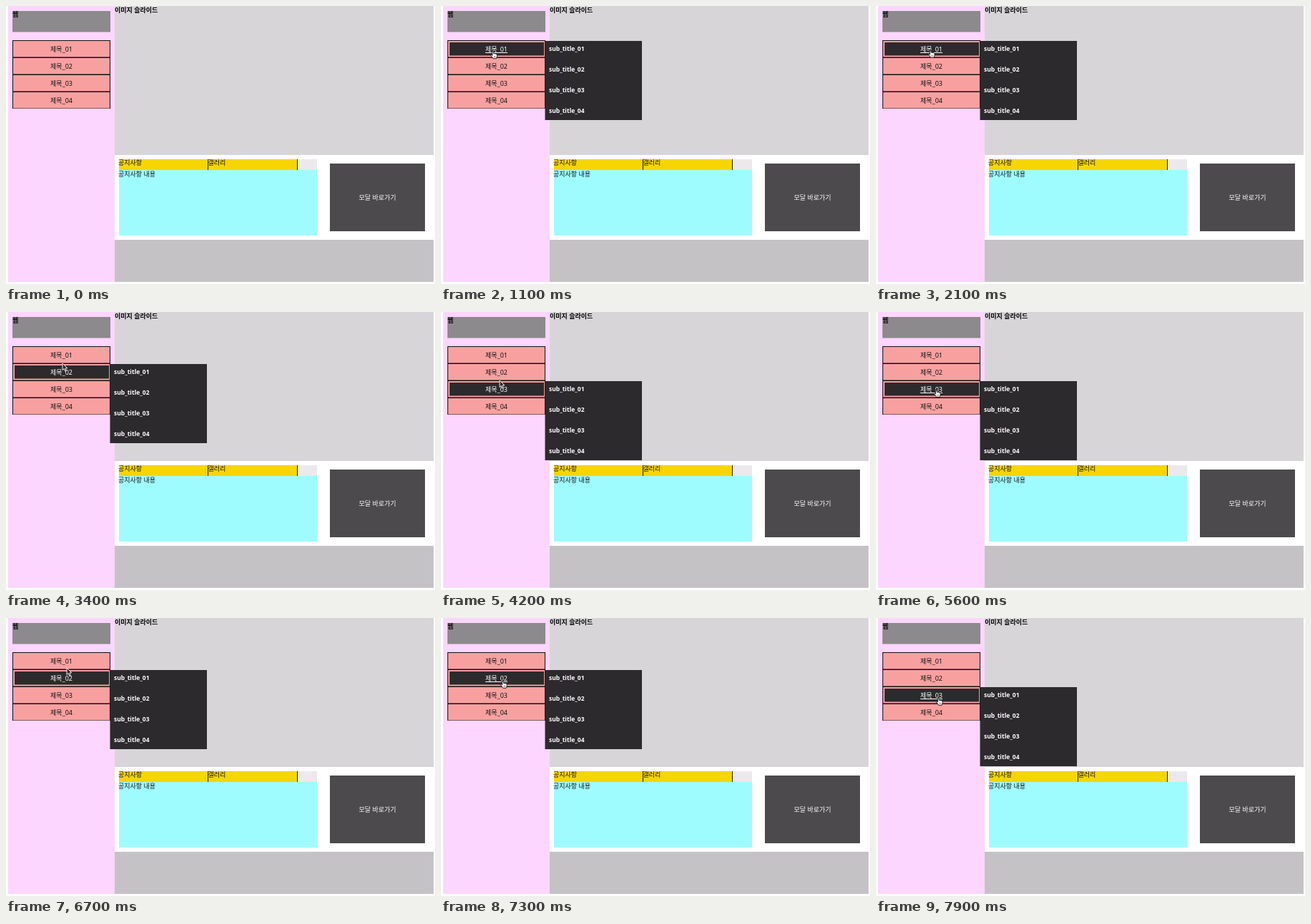
Write an HTML page with a canvas that moves like this. It is 600 px wide and 390 px high and loops after 8 s.

```html
<!DOCTYPE html>
<html lang="ko">
<head>
<meta charset="utf-8">
<style>
html, body { margin: 0; width: 100%; height: 100%; overflow: hidden; background: #fff; }
canvas { display: block; }
</style>
</head>
<body>
<canvas id="stage" width="600" height="390"></canvas>
<script>
const ctx = document.getElementById('stage').getContext('2d');
const LOOP = 8000, STEP = 100;
const FONT = '"Noto Sans", "Noto Sans CJK KR", "Noto Sans CJK", sans-serif';
const DARK = '#2c2a2c', PINK = '#f8a0a0';
const MENU_TOP = 48, ROW = 24;

// Pointer path: time, x, y
const PATH = [
  [200, 66, 84], [400, 68, 80], [700, 71, 64], [2100, 76, 62], [3000, 78, 66],
  [3400, 79, 72], [3900, 80, 84], [4200, 82, 96], [4600, 83, 108], [4900, 84, 124],
  [5200, 84, 124], [5600, 84, 109], [6300, 85, 86], [6700, 85, 70], [7200, 86, 84],
  [7900, 87, 112]
];

function rect(x, y, w, h, color) {
  ctx.fillStyle = color;
  ctx.fillRect(x, y, w, h);
}

function text(str, x, y, color = '#111', weight = 400, size = 9, align = 'left') {
  ctx.font = `${weight} ${size}px ${FONT}`;
  ctx.textAlign = align;
  ctx.fillStyle = color;
  ctx.fillText(str, x, y);
}

function pointerAt(t) {
  if (t < PATH[0][0]) return null;
  const i = PATH.findIndex(p => p[0] > t);
  if (i < 0) return { x: PATH[PATH.length - 1][1], y: PATH[PATH.length - 1][2] };
  const [t0, x0, y0] = PATH[i - 1], [t1, x1, y1] = PATH[i];
  const k = (t - t0) / (t1 - t0);
  return { x: x0 + (x1 - x0) * k, y: y0 + (y1 - y0) * k };
}

function drawPage() {
  rect(0, 0, 600, 390, '#fff');
  rect(3, 0, 149, 387, '#fcd6fe');
  rect(9, 7, 137, 29.5, '#8c8a8c');
  text('웹', 9, 15, '#111', 700);

  rect(152, 0, 446, 209, '#d7d5d7');
  text('이미지 슬라이드', 152, 9, '#000', 700);

  rect(158, 215, 277, 15, '#ebe9eb');
  rect(158, 215, 249, 15, '#f6d500');
  rect(282, 215, 1, 15, '#222');
  rect(407, 215, 1, 15, '#222');
  text('공지사항', 157, 223, '#111', 500);
  text('갤러리', 282.5, 223, '#111', 500);
  rect(158, 230, 277, 92, '#9ffcfe');
  text('공지사항 내용', 157, 238.5, '#111', 500);

  rect(453, 221, 133, 95, '#4c4a4c');
  text('모달 바로가기', 519.5, 271.5, '#fff', 500, 9, 'center');
  rect(152, 328, 446, 59, '#c4c2c4');
}

function drawMenu(active, linked) {
  rect(9, MENU_TOP, 137, 4 * ROW, '#111');
  for (let i = 0; i < 4; i++) {
    const y = MENU_TOP + i * ROW, on = i === active;
    rect(10, y + 1, 135, ROW - 1.5, PINK);
    if (on) rect(12, y + 3, 132, ROW - 5.5, DARK);
    text('제목_0' + (i + 1), 77.5, y + 16, on ? '#fff' : '#111', 500, 9, 'center');
    if (on && linked) rect(62, y + 17, 31, 1, '#fff');
  }
  if (active < 0) return;
  const top = MENU_TOP + active * ROW + 1;
  rect(145.5, top, 135.5, 111, DARK);
  for (let i = 0; i < 4; i++) {
    text('sub_title_0' + (i + 1), 151, top + 14 + i * 29, '#fff', 700, 8.5);
  }
}

function shape(x, y, points, fill, stroke) {
  ctx.beginPath();
  for (let i = 0; i < points.length; i += 2) ctx.lineTo(x + points[i], y + points[i + 1]);
  ctx.closePath();
  ctx.lineJoin = 'round';
  ctx.lineWidth = 1;
  ctx.fillStyle = fill;
  ctx.strokeStyle = stroke;
  ctx.fill();
  ctx.stroke();
}

function drawArrow({ x, y }) {
  shape(x, y, [0, 0, 0, 9.5, 2.2, 7.6, 3.8, 11.2, 5.4, 10.5, 3.9, 7, 6.8, 6.8], DARK, '#eee');
}

function drawHand({ x, y }) {
  shape(x, y, [-1, 0, 0.7, 0, 1.3, 3.4, 3, 3.3, 4.6, 3.8, 6, 4.6, 6, 7.5, 5, 10.3,
    0.6, 10.3, -1, 8, -3, 5.6, -2, 4.8, -0.4, 6], '#fff', '#222');
  rect(x + 1.5, y + 6.5, 0.6, 2.5, '#444');
  rect(x + 3.2, y + 6.5, 0.6, 2.5, '#444');
}

function draw(t) {
  const p = pointerAt(t);
  const hover = p && t >= 400;
  const offset = hover ? p.y - MENU_TOP + 2 : 0;
  const active = hover ? Math.floor(offset / ROW) : -1;
  const linked = hover && offset % ROW >= 5;
  drawPage();
  drawMenu(active, linked);
  if (p) (linked ? drawHand : drawArrow)(p);
}

const start = performance.now();
function tick() {
  const t = (performance.now() - start) % LOOP;
  draw(Math.floor(t / STEP) * STEP);
  requestAnimationFrame(tick);
}
tick();
</script>
</body>
</html>
```
